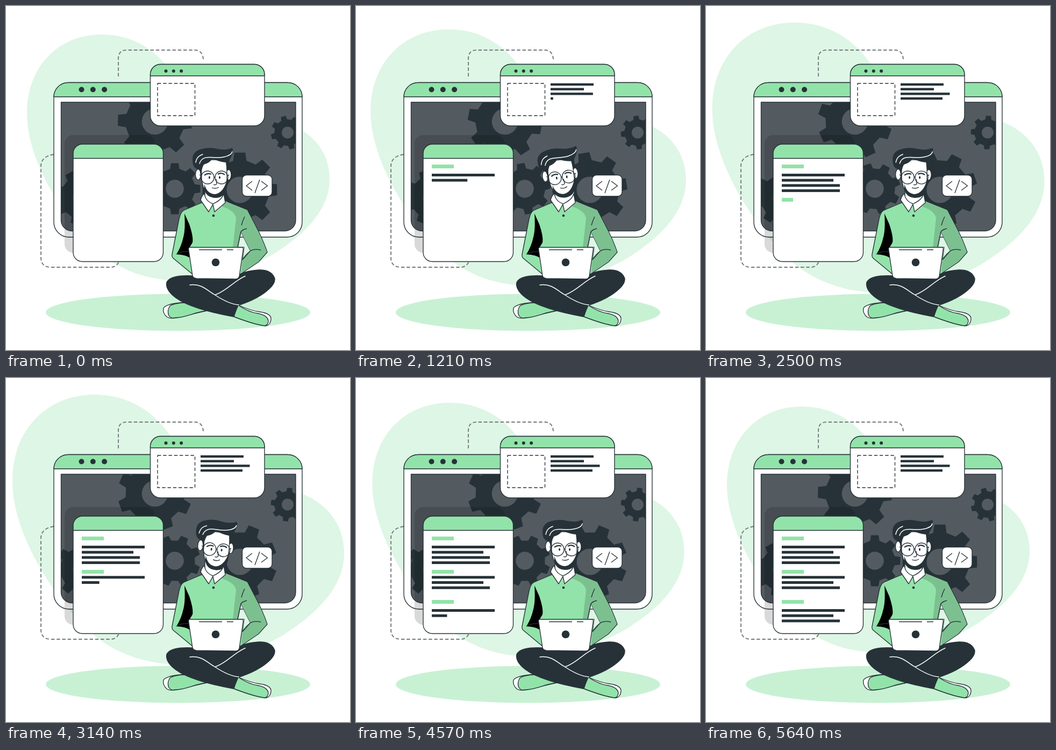
Write an HTML page that moves like this. It is 640 px wide and 640 px high and loops after 5.71 s.

```html
<!DOCTYPE html>
<html lang="en">
<head>
<meta charset="utf-8">
<title>Coding at the laptop</title>
<style>
  html, body { margin: 0; width: 100%; height: 100%; overflow: hidden; background: #fff; }
  svg { display: block; width: 100%; height: 100%; }
  .ink { fill: #263238; }
  .green { fill: #92e3a9; }
  .white { fill: #fff; }
  .none { fill: none; }
  .line { stroke: #263238; stroke-width: 1.35; stroke-linejoin: round; }
  .light { fill: none; stroke: #fff; stroke-width: 1.5; stroke-linecap: round; }
  .dash { stroke-dasharray: 6.4 3.84; }
  .faint { fill: none; stroke: #737a7e; stroke-width: 1.9; }
</style>
</head>
<body>
<svg viewBox="0 0 640 640">
  <defs>
    <clipPath id="screenClip"><path id="screenShape" d="M102.500 179H539V398.500A20 20 0 0 1 519 418.500H122.500A20 20 0 0 1 102.500 398.500Z"/></clipPath>
  </defs>

  <path id="blob" fill="#def6e5" d="M178 53C240 53 280 85 305 120C370 195 470 190 545 228C585 250 602 285 602 322C602 380 555 425 500 460C450 490 385 511 325 511C250 511 195 482 160 445C110 395 39 290 39 200C39 110 100 53 178 53Z"/>
  <ellipse cx="320" cy="570" rx="246" ry="34.500" fill="#c8f1d4"/>
  <path class="faint dash" d="M209 131V98Q209 82 225 82H352Q367 83 367 101M89 276Q65 280 65 298V468Q65 486 84 486H195Q205 486 210 476"/>

  <g id="screen"></g>
  <g clip-path="url(#screenClip)">
    <rect x="102" y="178" width="438" height="242" fill="#535b60"/>
    <g id="gears"></g>
  </g>
  <use href="#screenShape" class="none line"/>
  <rect x="109" y="240" width="168" height="219" rx="16" opacity=".15"/>
  <g id="windows"></g>
  <rect class="none line dash" x="282" y="144" width="69.500" height="60"/>
  <g id="rows"></g>

  <!-- code badge -->
  <rect class="white line" x="439.500" y="314.500" width="55.500" height="39.500" rx="8"/>
  <path class="none line" d="M458 326L447 334.500L458 343M472 323L463 348M475 326L486.500 334.500L475 343"/>

  <!-- shoes and legs -->
  <path class="white line" d="M338 551Q298 553 293 562Q291 572 300 579Q306 582 316 580L373 567Z"/>
  <path class="green line" d="M338 552Q314 552 305 558Q299 567 303 576Q307 582 316 580C336 579 350 570 373 567Z"/>
  <path class="white line" d="M431 556Q455 567 472 569Q494 572 493 583Q492 593 484 595Q464 593 424 578Z"/>
  <path class="green line" d="M431 556Q452 570 469 572Q488 576 488 587Q487 594 481 595Q460 592 424 578Z"/>
  <path class="ink line" d="M346 502Q306 500 299 514Q296 528 316 543Q345 564 423 578L432 557Q470 545 490 526Q501 516 500 507Q494 490 470 491Q450 492 434 499Z"/>
  <path class="light" d="M342 519C365 516 375 530 388 537C400 545 418 555 433 556M390 537C410 530 425 511 445 502.500"/>

  <!-- torso, open between right arm and body -->
  <g fill-rule="evenodd">
    <path class="green line" d="M364 366L331 380Q325 383 322 396L309 462Q308 467 312 470L347 499H436L470 476L486 458Q478 434 464 408L449 379L407 362ZM437 420L455 456Q446 461 440 472L443 449H431Z"/>
    <path fill="#7cc090" d="M402 373L408 364L448 379.500L463 408Q477 434 485 457L470 475L438 496L441 449H422L428 395Q426 381 402 373ZM437 420L455 456Q446 461 440 472L443 449H431Z"/>
  </g>
  <path d="M332 386L341 406Q349 430 347 440L341 450L343 469Q335 463 317 462Q326 448 330 430Q334 415 332 386Z"/>
  <path class="none line" d="M317 462Q325 456 340 457M444 392Q440 400 438 408M448 414Q440 416 437 420L431 448M474 454Q462 451 454 456L440 472"/>
  <path class="white line" d="M341 449H440Q442 450 441 455L434 503Q432 508 427 508L354 507Q348 506 347 502L340 455Q339 450 341 449Z"/>
  <path class="none line" d="M359 453.500H402M411 453.500H423"/>
  <circle class="ink" cx="390" cy="477" r="7.300"/>

  <!-- neck and head -->
  <path class="white line" d="M370 340V360L385 370L406 356V335Z"/>
  <g id="head">
    <ellipse class="white line" cx="357.500" cy="313.500" rx="5" ry="10"/>
    <ellipse class="white line" cx="414" cy="314" rx="5" ry="10"/>
    <path class="white line" d="M363 286H411V322Q411 356 389 356Q368 354 364 322Z"/>
    <path class="ink" d="M369 331Q374 350 389 350Q404 348 411 324V337Q408 357 389 357Q372 356 369 341Z"/>
    <path class="ink" d="M363 319L360 304Q347 303 347 287Q346 274 358 268Q376 261 394 266Q410 269 421 264Q425 270 418 283Q413 288 416 304L411 307L409 291Q397 290 384 284Q379 292 368 295Q363 304 363 319Z"/>
    <path class="light" d="M353 291C355 281 360 278 366 276M360 293C367 274 385 285 405 281C415 279 420 276 421 271"/>
    <g class="none line"><circle cx="375" cy="319" r="12"/><circle cx="401" cy="319" r="12"/>
      <path d="M387 319Q388 317 389 319M363 316L360 314M413 316L415 314M391 322L392 331Q389 334 386 332M383 338Q390 341 396 337"/>
      <path stroke-width="2.200" d="M369 315Q375 310 382 313M394 313Q401 309 407 314"/></g>
    <ellipse class="ink" cx="378.500" cy="319" rx="1.500" ry="2.600"/><ellipse class="ink" cx="397.500" cy="319" rx="1.500" ry="2.600"/>
  </g>
  <path class="white line" d="M369 349Q364 353 362 361L377 383L385 369L388 383L408 366L405 349Q402 361 385 368Q371 363 369 349Z"/>
  <circle class="ink" cx="386" cy="390" r="2.300"/>
</svg>
<script>
const LOOP = 5710, STEP = 70, ROW_TIME = 500;
const byId = id => document.getElementById(id);
const clamp = v => Math.max(0, Math.min(1, v));
const smooth = v => (1 - Math.cos(Math.PI * v)) / 2;
const pulse = (t, center, half) => smooth(clamp(1 - Math.abs(t - center) / half));

function add(parent, tag, attrs) {
  const node = document.createElementNS("http://www.w3.org/2000/svg", tag);
  for (const name in attrs) node.setAttribute(name, attrs[name]);
  return byId(parent).appendChild(node);
}

function addWindow(parent, x, y, width, height, corner, header) {
  const r = Math.min(corner, header);
  add(parent, "rect", { x, y, width, height, rx: corner, class: "white line" });
  add(parent, "path", {
    class: "green line",
    d: `M${x} ${y + header}V${y + r}a${r} ${r} 0 0 1 ${r} ${-r}h${width - 2 * r}a${r} ${r} 0 0 1 ${r} ${r}V${y + header}Z`
  });
}

function addDots(parent, x, y, gap, r) {
  for (let i = 0; i < 3; i++) add(parent, "circle", { cx: x + i * gap, cy: y, r, class: "ink" });
}

addWindow("screen", 89, 142.5, 462, 287.5, 28, 26.5);
addDots("screen", 140.5, 155.5, 21.3, 5);
addWindow("windows", 125, 257, 167.5, 218.5, 17, 26.5);
addWindow("windows", 268.5, 108.5, 212.5, 114.5, 19, 21.5);
addDots("windows", 297.5, 121, 14.3, 3);

// eight teeth, each a trapezoid standing on the rim
function gearPath(radius) {
  const corner = (deg, r) => {
    const a = deg * Math.PI / 180;
    return `${r * Math.cos(a)} ${r * Math.sin(a)}`;
  };
  let d = "";
  for (let deg = 0; deg < 360; deg += 45)
    d += `${d ? "L" : "M"}${corner(deg - 13, radius * .79)}L${corner(deg - 8.5, radius)}L${corner(deg + 8.5, radius)}L${corner(deg + 13, radius * .79)}`;
  return d + "Z";
}

function addGear(x, y, radius, start, direction) {
  const node = add("gears", "path", { d: gearPath(radius), class: "ink" });
  add("gears", "circle", { cx: x, cy: y, r: radius * .35, fill: "#535b60" });
  return turn => node.setAttribute("transform", `translate(${x} ${y}) rotate(${start + direction * turn})`);
}

const gears = [
  addGear(277, 215, 69.5, 2, -1),
  addGear(314, 340, 48, 0, 1),
  addGear(435, 342, 70, 0, 1),
  addGear(142, 356, 52, 16, -1),
  addGear(524, 235.5, 31.5, -15, -1)
];

const rows = [];
function addRow(x, y, width, height, start, color) {
  rows.push({ node: add("rows", "rect", { x, y, height, class: color }), width, start });
}

[80, 62, 91.5, 78].forEach((width, i) =>
  addRow(362, 143.8 + i * 8.7, width, 4.4, 50 + i * 400, "ink"));

// the document pauses briefly after its first three rows
let typed = 0;
const nextStart = () => typed < 3 ? 136 + 400 * typed++ : 500 + 363 * typed++;
function addParagraph(headingY, firstY, count) {
  addRow(141, headingY, 41, 7, nextStart(), "green");
  [117, 96, 108, 108].slice(0, count).forEach((width, i) =>
    addRow(141, firstY + i * 9.7, width, 5, nextStart(), "ink"));
}
addParagraph(295, 312, 4);
addParagraph(357, 368.3, 3);
addParagraph(413, 430, 3);

function draw(now) {
  // the opening pose holds for one step, then the motion runs a step ahead
  const shown = now % LOOP, t = shown < STEP ? 0 : shown + STEP;
  const scale = 1 + .1 * smooth(2 * t / LOOP);
  const tilt = 6.5 * pulse(t, 3580, 1130) - 7 * pulse(t, 1240, 1300);
  byId("blob").setAttribute("transform", `translate(320 282) scale(${scale}) translate(-320 -282)`);
  byId("head").setAttribute("transform", `rotate(${tilt} 385 362)`);
  for (const turnTo of gears) turnTo(360 * t / LOOP);
  for (const { node, width, start } of rows)
    node.setAttribute("width", width * clamp((t - start) / ROW_TIME));
}

const begin = performance.now();
function tick() {
  draw(performance.now() - begin);
  requestAnimationFrame(tick);
}
tick();
</script>
</body>
</html>
```
